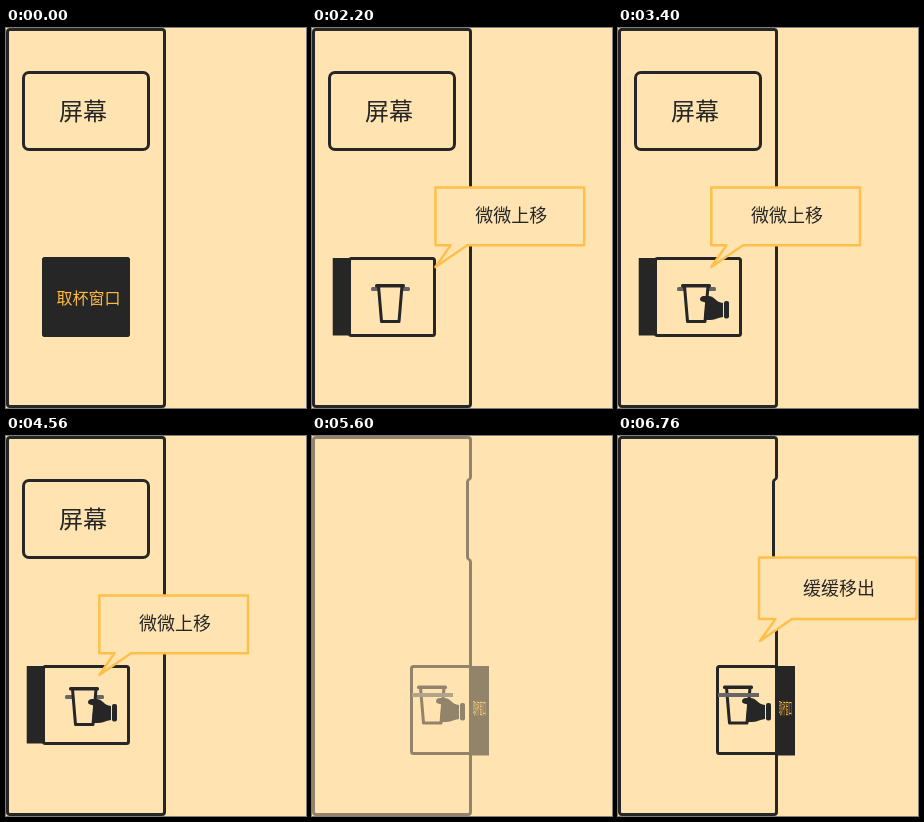
An HTML page that plays this animation: 300 by 380 pixels, repeating every 8000 ms.

```html
<!DOCTYPE html>
<html lang="zh">
<head>
<meta charset="utf-8">
<title>取杯流程</title>
<style>
html, body { margin: 0; width: 100%; height: 100%; overflow: hidden; background: #ffe4b2; }
svg { display: block; width: 300px; height: 380px; }
text { font-family: "Noto Sans CJK SC", "Noto Sans CJK", sans-serif; fill: #262626; text-anchor: middle; }
.line { fill: none; stroke: #262626; stroke-width: 3; stroke-linejoin: round; }
.dark { fill: #262626; }
.tray { fill: #666; }
.label { font-size: 16px; fill: #ffbb41; }
.bubble { fill: #ffe4b2; stroke: #ffc04a; stroke-width: 2.5; stroke-linejoin: round; }
</style>
</head>
<body>
<svg viewBox="0 0 300 380">
  <defs>
    <g id="cup">
      <path class="line" d="M66.5 258L69.5 293.5H87L90 258"/>
      <rect class="dark" x="63" y="256" width="30" height="3.6" rx="1.5"/>
    </g>
    <g id="hand" class="dark">
      <path d="M82 271.5Q82 268 86 268H91Q94 268 97 271Q100 274.5 105 275V289Q100 290 97 291.3Q95 292 92 292H86L87.5 274.5L84 273.5Q82 273 82 271.5Z"/>
      <rect x="106" y="273" width="5" height="17.5" rx="2"/>
    </g>
  </defs>

  <g id="front">
    <rect class="line" x="1.5" y="1.5" width="157" height="377" rx="2.5"/>
    <rect class="line" x="17.5" y="44.5" width="125" height="77" rx="5.5"/>
    <text x="77" y="92" font-size="24">屏幕</text>
    <rect class="line" x="37.5" y="230.5" width="85" height="77" rx="2"/>
    <rect class="tray" x="59" y="259" width="9" height="4" rx="1.5"/>
    <rect class="tray" x="89" y="259" width="9" height="4" rx="1.5"/>
    <g id="lift">
      <use href="#cup"/>
      <use id="reach" href="#hand"/>
    </g>
    <rect id="panel" class="dark"/>
    <g id="panelText"><text class="label" x="46.5" y="276">取杯窗口</text></g>
    <g id="tip1">
      <path class="bubble" d="M93.3 159.5H242V217.3H125L93.3 239L108.5 217.3H93.3Z"/>
      <text x="169" y="194" font-size="18">微微上移</text>
    </g>
  </g>

  <g id="side">
    <path class="line" d="M4 1.5H156Q158.5 1.5 158.5 4V41Q158.5 42.8 157 43.5Q155.5 44.2 155.5 46V121Q155.5 122.8 157 123.5Q158.5 124.2 158.5 126V376Q158.5 378.5 156 378.5H4Q1.5 378.5 1.5 376V4Q1.5 1.5 4 1.5Z"/>
    <rect class="line" x="99.5" y="230.5" width="59" height="87" rx="2"/>
    <use href="#cup" transform="translate(42 -6.5)"/>
    <use href="#hand" transform="translate(42 -6)"/>
    <rect class="tray" x="100" y="257" width="41" height="4"/>
    <rect class="dark" x="158" y="230" width="19" height="89.5"/>
    <g transform="translate(167.5 0) scale(.2 1)"><text class="label" y="278">取杯窗口</text></g>
    <g id="tip2">
      <path class="bubble" d="M141 121.5H298.5V183H174L142 205L157.5 183H141Z"/>
      <text x="221" y="159" font-size="18">缓缓移出</text>
    </g>
  </g>
</svg>
<script>
const LOOP = 8000, STEP = 40;
const el = id => document.getElementById(id);
const set = (id, attrs) => {
  for (const k in attrs) el(id).setAttribute(k, attrs[k]);
};
const part = (t, from, to) => Math.min(1, Math.max(0, (t - from) / (to - from)));
const outQuad = p => 1 - (1 - p) ** 2;
const inOutSine = p => (1 - Math.cos(Math.PI * p)) / 2;
const outBack = (p, s) => 1 + (s + 1) * (p - 1) ** 3 + s * (p - 1) ** 2;
const show = (id, on) => set(id, { visibility: on ? "inherit" : "hidden" });
const move = (id, x, y) => set(id, { transform: `translate(${x} ${y})` });

// The panel swings round its left hinge; its back carries no label.
function swing(p) {
  const c = Math.cos(p * 100 * Math.PI / 180);
  const w = 88 * Math.abs(c), facing = c > 0;
  set("panel", {
    x: facing ? 36 : 36 - w, y: facing ? 229 : 230,
    width: facing ? w : w + 2, height: facing ? 80 : 77.5,
    rx: 3 * Math.abs(c)
  });
  set("panelText", { transform: `translate(36 0) scale(${Math.max(c, 0.001)} 1)` });
  show("panelText", facing);
}

function draw(t) {
  swing(outQuad(part(t, 800, 1620)));

  show("tip1", t >= 2040);
  move("tip1", 208 * (1 - outBack(part(t, 2035, 2520), 0.96)), 0);

  show("reach", t >= 2840);
  move("reach", 124 * (1 - outQuad(part(t, 2800, 3400))), 0);
  move("lift", 0, -5 * inOutSine(part(t, 4040, 4580)));

  set("front", { opacity: 1 - part(t, 4800, 5200) });
  set("side", { opacity: part(t, 5400, 5800) });

  show("tip2", t >= 6080);
  move("tip2", 160 * (1 - outBack(part(t, 6065, 6760), 1.08)), 0);
}

function frame() {
  const t = performance.now() % LOOP;
  draw(Math.floor(t / STEP) * STEP);
  requestAnimationFrame(frame);
}
draw(0);
requestAnimationFrame(frame);
</script>
</body>
</html>
```
